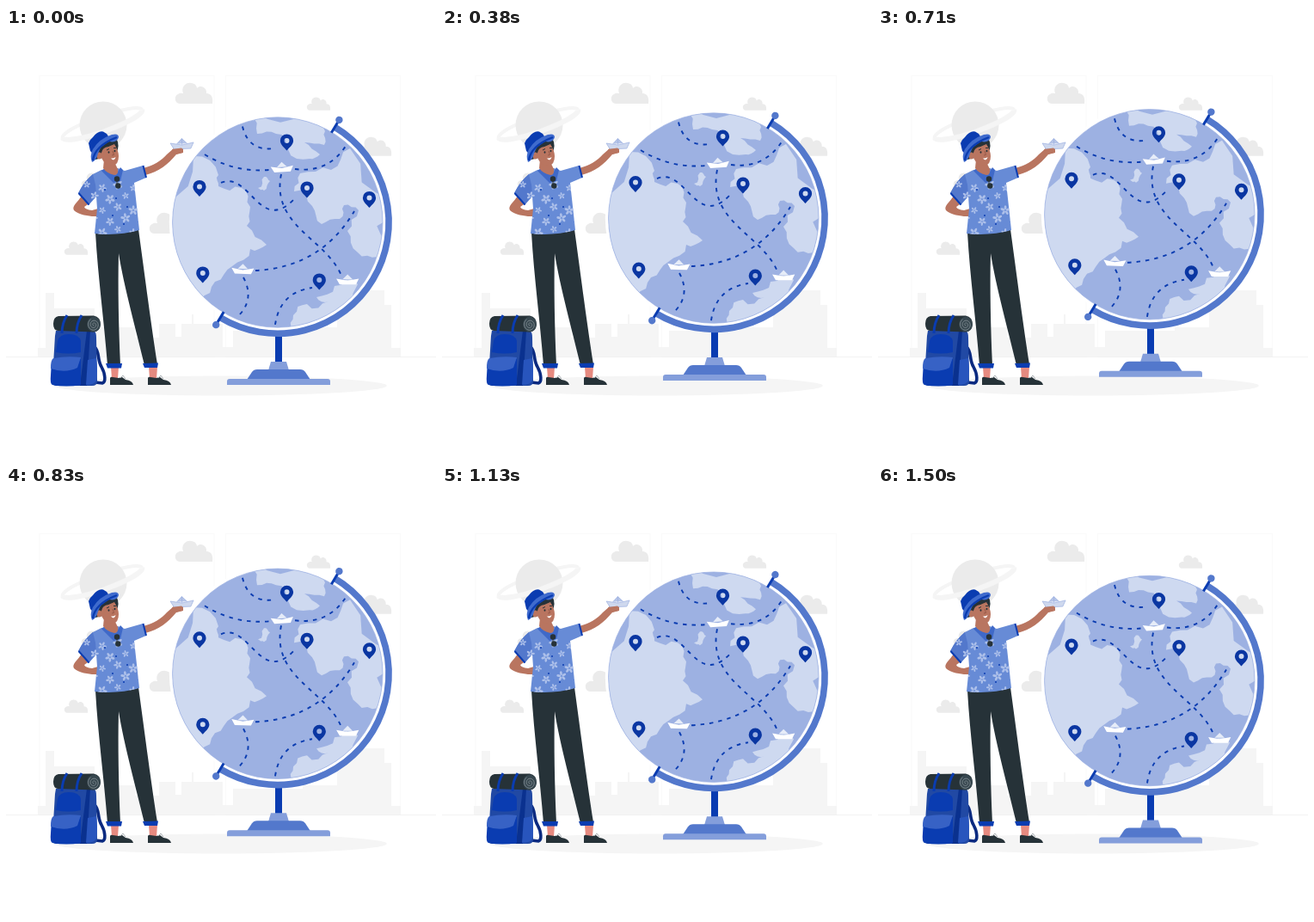
Animation of 500x500 px, one loop 1540 ms. Source, as an HTML page with a canvas:

```html
<!DOCTYPE html>
<html lang="en">
<head>
<meta charset="utf-8">
<title>Traveller and globe</title>
<style>
html, body { margin: 0; width: 100%; height: 100%; overflow: hidden; background: #fff; }
canvas { display: block; width: 100vw; height: 100vh; }
</style>
</head>
<body>
<canvas id="stage"></canvas>
<script>
const SIZE = 500, LOOP = 1540, PHASE = 58, LIFT = 10, TAU = Math.PI * 2;
const BLUE = '#0a3cb1', MID = '#5378cc', SOFT = '#849edb', SEA = '#9db1e2', LAND = '#ced9f0';
const DARK = '#263238', SKIN = '#b97560', PALE = '#f5f5f5', GREY = '#ebebeb';

const canvas = document.getElementById('stage');
const ctx = canvas.getContext('2d');
const ratio = window.devicePixelRatio || 1;
canvas.width = canvas.height = SIZE * ratio;

const fill = (color, d, rule = 'nonzero') => {
  ctx.fillStyle = color;
  ctx.fill(new Path2D(d), rule);
};
const line = (color, width, d) => {
  ctx.strokeStyle = color;
  ctx.lineWidth = width;
  ctx.stroke(new Path2D(d));
};
const oval = (color, x, y, rx, ry = rx) => {
  ctx.fillStyle = color;
  ctx.beginPath();
  ctx.ellipse(x, y, rx, ry, 0, 0, TAU);
  ctx.fill();
};
const arc = (color, width, x, y, rx, ry, turn, from, to) => {
  ctx.strokeStyle = color;
  ctx.lineWidth = width;
  ctx.beginPath();
  ctx.ellipse(x, y, rx, ry, turn, from, to);
  ctx.stroke();
};
const at = (x, y, turn, scale, paint) => {
  ctx.save();
  ctx.translate(x, y);
  ctx.rotate(turn);
  ctx.scale(scale, scale);
  paint();
  ctx.restore();
};

let seed = 7;
const random = () => (seed = seed * 16807 % 2147483647) / 2147483647;

// Splits each side at a nudged midpoint until the coastline is ragged.
function roughen(points, rounds) {
  if (!rounds) return points;
  return roughen(points.flatMap(([x, y], i) => {
    const [nx, ny] = points[(i + 1) % points.length];
    const push = (random() - 0.5) * 0.5;
    return [[x, y], [(x + nx) / 2 + (ny - y) * push, (y + ny) / 2 - (nx - x) * push]];
  }), rounds - 1);
}

function coast(text) {
  const path = new Path2D();
  const corners = text.split(' ').map(p => p.split(',').map(Number));
  roughen(corners, 2).forEach(([x, y]) => path.lineTo(x, y));
  path.closePath();
  return path;
}

// A curve bent sideways by fractions of its own length.
function route(x1, y1, x2, y2, bend, endBend = bend) {
  const dx = x2 - x1, dy = y2 - y1, path = new Path2D();
  path.moveTo(x1, y1);
  path.bezierCurveTo(x1 + dx / 3 - dy * bend, y1 + dy / 3 + dx * bend,
    x1 + dx * 2 / 3 - dy * endBend, y1 + dy * 2 / 3 + dx * endBend, x2, y2);
  return path;
}

const lands = [
  coast('180,200 218,149 247,171 247,184 274,186 284,208 280,230 303,252 284,257 263,277 243,295 227,318 180,290'),
  coast('290,98 292,123 314,123 328,141 353,152 365,147 347,133 370,136 371,120 348,98'),
  coast('400,140 378,165 342,169 335,190 356,207 367,228 388,222 393,206 410,212 397,236 409,261 432,266 450,200'),
  coast('300,173 307,178 300,189 293,186'),
  coast('330,352 334,334 350,321 375,318 361,313 382,300 409,298 400,345')
];

const routes = [
  route(275, 114.5, 312, 140, 0.3),
  route(231, 147, 306, 165, 0.11),
  route(336, 164, 397, 134, 0.22),
  route(250, 180, 334, 200, -0.25, 0.55),
  route(320, 170, 390, 288, 0.3, -0.05),
  route(290, 282, 405, 213, 0.18),
  route(276, 290, 268, 337, -0.26),
  route(313, 345, 356, 302, -0.25)
];

function cloud(x, y, width) {
  at(x, y, 0, width / 43, () => fill(GREY,
    'M5,25C-1,25 -2,16 3,14C5,12 8,13 9,13C6,5 13,0 18,1C23,1 25,5 25,7C30,2 37,7 36,13C42,13 44,18 43,25Z'));
}

function background() {
  for (const x of [39, 255.5]) {
    ctx.strokeStyle = '#fafafa';
    ctx.lineWidth = 1;
    ctx.strokeRect(x, 55.5, 203, 327);
  }
  fill(PALE, 'M37,382V372H46V308H56V326H103V348H150V360H178V344H197V359H204V344H216V333H218V344H252V371H264V352H345V348' +
    'H385V305H440V322H448V372H459V382Z');

  const ring = (width, from) => arc(PALE, width, 112, 111.5, 49, 9, -0.34, from, from + Math.PI);
  ring(4, Math.PI);
  oval(GREY, 113, 113, 27.5);
  ring(6, 0);

  cloud(197, 63, 43);
  cloud(350, 80, 27);
  cloud(409, 126, 39);
  cloud(68, 248, 27);
  cloud(167, 214, 43);
  cloud(88, 168, 30);
  ctx.fillStyle = GREY;
  ctx.fillRect(0, 382, SIZE, 0.6);
  oval(PALE, 250, 416, 193, 11.4);
}

function boat(hull, sail) {
  fill(sail, 'M-6,-2L0,-8L6,-2Z');
  fill(hull, 'M-13.500,-3L0,-0.500L13.500,-3L10,4H-9.500Z');
}

function pin(x, y) {
  at(x, y, 0, 1, () => fill('#0a36a2', 'M0,11.500C-3,8 -7.600,4.500 -7.600,0A7.600,7.600 0 0 1 7.600,0C7.600,4.500 3,8 0,11.500Z' +
    'M-3,0A3,3 0 0 0 3,0A3,3 0 0 0 -3,0Z', 'evenodd'));
}

function stand() {
  fill(BLUE, 'M313,356H321V390H313Z');
  fill(SOFT, 'M308,388H326L329,398H305Z');
  fill(MID, 'M280,409L286,400Q288,397 292,397H342Q346,397 348,400L354,409Z');
  fill(SOFT, 'M257,415V411Q257,408 260,408H374Q377,408 377,411V415Z');
}

function globe() {
  const cx = 315.8, cy = 226, radius = 122.2, tilt = -59 * Math.PI / 180;
  stand();

  // A white halo separates the ball from its frame.
  oval('#fff', cx, cy, 126);
  oval(SEA, cx, cy, radius);
  ctx.save();
  ctx.clip();
  ctx.fillStyle = LAND;
  lands.forEach(land => ctx.fill(land));
  ctx.restore();
  arc(SEA, 0.7, cx, cy, radius, radius, 0, 0, TAU);

  arc(MID, 7.6, cx, cy, 129.3, 129.3, tilt, 0, Math.PI);
  for (const turn of [tilt, tilt + Math.PI]) at(cx, cy, turn, 1, () => {
    line(BLUE, 3, 'M121.500,0H138');
    oval(MID, 139, 0, 4.2);
  });

  ctx.strokeStyle = BLUE;
  ctx.lineWidth = 1.9;
  ctx.setLineDash([4.5, 6]);
  routes.forEach(path => ctx.stroke(path));
  ctx.setLineDash([]);

  const ship = (x, y, turn) => at(x, y, turn, 0.97, () => boat('#fff', '#e6ecf8'));
  ship(321, 163.5, -0.07);
  ship(275.3, 282, 0.03);
  ship(397.2, 294.3, 0);
  pin(326.5, 131);
  pin(225, 184.5);
  pin(350, 186);
  pin(422.5, 197.5);
  pin(228.8, 285);
  pin(364.3, 293);
}

function flower(x, y, size) {
  for (let petal = 0; petal < 5; petal++) {
    at(x, y, petal * TAU / 5 + x, 1, () => oval('#adc0ea', size * 0.58, 0, size * 0.45, size * 0.25));
  }
}

function legs() {
  fill('#e68a80', 'M122,394H131L130,408H123ZM166,394H176L175,408H167Z');
  for (const x of [121, 165]) at(x, 405, 0, 1, () => {
    fill(DARK, 'M0,2Q1,0 3,1L10,2L14,1L18,4Q26,5 27,10H0Z');
    line('#aab0b4', 1, 'M12,2L15,-1L18,3');
  });
  fill(DARK, 'M104,238Q130,240 154,234C159,270 168,340 176,391L161,392C151,350 137,300 131,262C130,300 131,350 133,392' +
    'H118C114,340 107,290 104,238Z');
  fill(BLUE, 'M116,390L135,390L134,395.500H118ZM159,390L177,389.500L176,395H161Z');
}

function shirt() {
  const outline = 'M111,165L101,170Q91,178 84,192L96,206L105,196L106,210L103,239Q130,242 155,235L149,180L163,174L159,160L138,166L130,163Z';
  fill('#678bd6', outline);
  fill(MID, 'M101,170Q91,178 84,192L96,206L105,194L104,182Z');
  ctx.save();
  ctx.clip(new Path2D(outline));
  for (let row = 0; row < 5; row++) {
    for (let column = 0; column < 4; column++) {
      const x = 94 + column * 18 + row % 2 * 9, y = 182 + row * 13;
      flower(x, y + column % 2 * 4, 4 + (row + column) % 3 * 0.8);
    }
    oval(BLUE, 115 + row * 13 % 30, 188 + row * 10, 1);
  }
  ctx.restore();
  line(BLUE, 2, 'M84.500,192L96.500,205.500M159.500,160L163,174');
  fill('#3f69c8', 'M111,166L115,163L128,171L133,162L136,165L133,178L125,180Z');
}

function head() {
  fill(SKIN, 'M114,153L127,158L130,164Q131,171 126,171Q117,169 113,163Z');
  line(DARK, 1, 'M129,176V183');
  oval(DARK, 129, 175.5, 3.2);
  oval(DARK, 130.3, 183.5, 3.2);

  fill(DARK, 'M104,153Q103,137 114,130L129,130Q132,136 129,144L112,151Z');
  fill(SKIN, 'M111,145Q112,139 119,138L126,135Q131,143 131,149Q131,159 124,160Q115,160 111,151Z');
  oval(SKIN, 108.5, 148.5, 3, 4);
  line(DARK, 1, 'M117,142L120,140.500M125,139.500L128,139.500');
  oval(DARK, 119.5, 144.5, 0.9, 1.2);
  oval(DARK, 126.5, 143, 0.9, 1.2);
  line('#8f5446', 0.8, 'M124,143L125.500,147.500L123,148');
  fill('#fff', 'M122,151.500Q125,152 127.500,150Q127,153 125,153.500Q123,153 122,151.500Z');

  fill(BLUE, 'M98,143L96,134Q97,130 101,127Q107,119 113,120.500Q117,122 119,126L121,131L101,146Z');
  fill('#3f6bcd', 'M100,156Q97,149 101,141Q108,129 123,124Q131,122 131,127Q129,134 120,132Q110,136 107,146Q105,154 100,156Z');
  line(BLUE, 2.4, 'M101,154Q103,137 129,127');
}

function man() {
  legs();
  fill(SKIN, 'M88,195C84,202 76,207 79,212C84,217 97,219 102,219L112,219Q115,212 109,209.500L100,212Q92,211 91,208L98,203Z');
  fill(SKIN, 'M159,163C172,160 181,154 187,147L195,140Q200,137 206,140V145L198,147C188,159 178,167 162,171Z');
  shirt();
  head();
  at(204.7, 136.5, -0.04, 1, () => {
    boat('#ced8ee', '#b5c4e7');
    line(SEA, 0.7, 'M-13.500,-3L0,-0.500L13.500,-3L10,4H-9.500ZM-6,-2L0,-8L6,-2M0,-8V-0.500');
  });
  fill(SKIN, 'M193,141L204,139.500Q207,141 205,145L197,147Z');
}

function backpack() {
  line('#0a2a80', 3.6, 'M103,371C109,376 106,386 111,394C116,403 116,412 112,413L104,412');
  fill('#2149a4', 'M58,352H102Q105,353 105,360L106,411Q106,416 100,416H58Q53,416 54,408L57,358Z');
  fill('#0a318f', 'M94,352H98L94,416H86Z');
  fill(BLUE, 'M58,377L60,364Q62,356 73,356Q85,356 87,364V377Q73,380 58,377Z');
  fill(BLUE, 'M53,387Q70,381 87,385V415Q70,418 54,415Q51,414 52,404Z');
  fill('#3762c5', 'M55,384Q71,381 87,383L83,395Q69,402 52,396Q52,386 55,384Z');
  fill('#2855bd', 'M95,386L105,384Q107,398 105,410Q103,415 93,415Z');
  fill(DARK, 'M61,335L102,334.500Q110,336 110,345Q109,353 102,353.500L60,352Q55,351 55,344Q55,336 61,335Z');
  oval('#37474f', 102, 344.5, 7.8, 9);
  ctx.strokeStyle = '#89949a';
  ctx.lineWidth = 0.8;
  ctx.beginPath();
  for (let a = 0; a < 17; a += 0.25) ctx.lineTo(102 + a * 0.41 * Math.cos(a), 345 + a * 0.44 * Math.sin(a));
  ctx.stroke();
  line(BLUE, 3, 'M71,334Q65,343 65,355M88,334Q82,343 82,355');
}

function draw(now) {
  const cycle = (now + PHASE) % LOOP / LOOP;
  const rise = 1 - Math.abs(1 - cycle * 2);
  ctx.setTransform(canvas.width / SIZE, 0, 0, canvas.height / SIZE, 0, 0);
  ctx.fillStyle = '#fff';
  ctx.fillRect(0, 0, SIZE, SIZE);
  background();
  at(0, LIFT * (PHASE * 2 / LOOP - rise), 0, 1, globe);
  man();
  backpack();
}

const start = performance.now();
function tick() {
  draw(performance.now() - start);
  requestAnimationFrame(tick);
}
tick();
</script>
</body>
</html>
```
